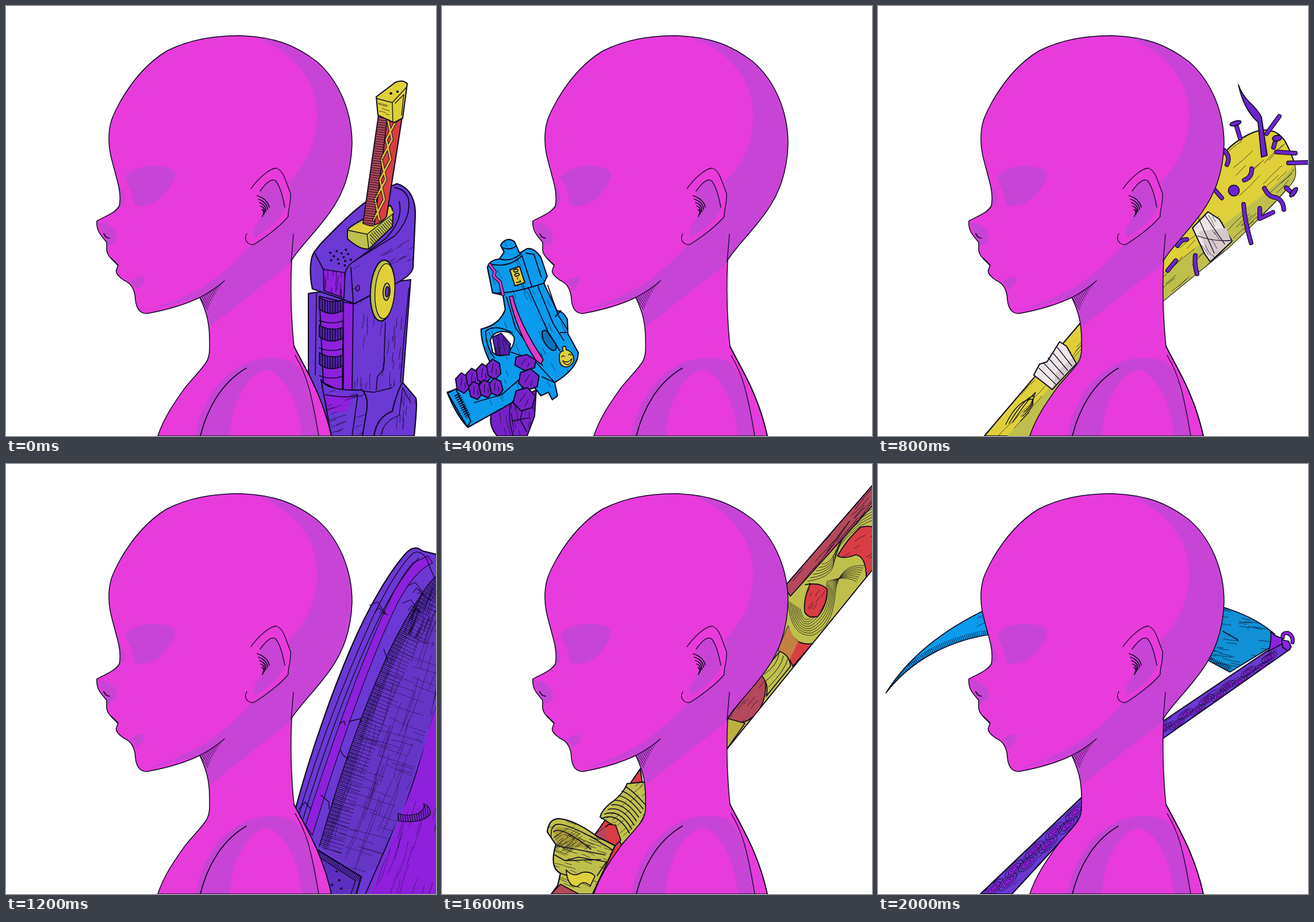
These frames come from a looping animation (748x748 px, 2400 ms). An HTML page:

```html
<!DOCTYPE html>
<html lang="en">
<head>
<meta charset="utf-8">
<title>Weapon cycle</title>
<style>
  html, body { margin: 0; width: 100%; height: 100%; overflow: hidden; background: #fff; }
  svg { display: block; width: 100vw; height: 100vh; }
  path, ellipse { stroke-linecap: round; stroke-linejoin: round; }
</style>
</head>
<body>
<svg id="stage" viewBox="0 0 748 748"></svg>
<script>
const STEP = 400;
const ink = '#0b0820', pink = '#e83bdc', mauve = '#c844d6', indigo = '#6b38d4', violet = '#8e20dc',
  plum = '#5521aa', grape = '#7722c8', yellow = '#dfd03a', olive = '#bfc04b', red = '#d93d43',
  wine = '#b5485a', blue = '#0a9bec', steel = '#1090d6', bone = '#eee6e6';

let seed = 7, clips = 0;
const rand = (a, b) => {
  seed = seed + 0x6d2b79f5 | 0;
  let t = Math.imul(seed ^ seed >>> 15, 1 | seed);
  t = t + Math.imul(t ^ t >>> 7, 61 | t) ^ t;
  return a + (b - a) * ((t ^ t >>> 14) >>> 0) / 2 ** 32;
};
const repeat = (n, make) => Array.from({ length: n }, (_, i) => make(i)).join('');
const polar = (r, deg) => [r * Math.cos(deg * Math.PI / 180), r * Math.sin(deg * Math.PI / 180)];

const shape = (d, fill, w = 1.7, stroke = ink) =>
  `<path d="${d}" fill="${fill}" stroke="${stroke}" stroke-width="${w}"/>`;
const flat = (d, fill) => shape(d, fill, 0);
const line = (d, w = 1.3, color = ink) => shape(d, 'none', w, color);
const oval = (x, y, rx, ry, fill, turn = 0, w = 1.6) =>
  `<ellipse rx="${rx}" ry="${ry}" fill="${fill}" stroke="${ink}" stroke-width="${w}" transform="translate(${x} ${y}) rotate(${turn})"/>`;
const clipped = (d, content) => {
  const id = 'clip' + clips++;
  return `<clipPath id="${id}"><path d="${d}"/></clipPath><g clip-path="url(#${id})">${content}</g>`;
};
// Outlines use absolute coordinate pairs only, so their bounds can be read from the path.
const bounds = d => {
  const n = d.match(/[\d.]+/g).map(Number);
  const range = odd => {
    const v = n.filter((_, i) => i % 2 === odd);
    return [Math.min(...v), Math.max(...v)];
  };
  return [range(0), range(1)];
};
// Scattered, slightly bent pen strokes inside an outline.
const grain = (d, angle, length, count, w = 0.7) => {
  const [xs, ys] = bounds(d);
  return clipped(d, line(repeat(count, () => {
    const [dx, dy] = polar(length * rand(0.4, 1.2), angle + rand(-4, 4));
    const bend = rand(-0.08, 0.08);
    const p = [rand(...xs) - dx / 2, rand(...ys) - dy / 2].map(v => v.toFixed(1));
    const q = [dx / 2 - dy * bend, dy / 2 + dx * bend, dx, dy].map(v => v.toFixed(1));
    return `M${p}q${q}`;
  }), w));
};
// Short hatch marks across a guide line, kept inside an outline.
const fringe = (d, guide, width, gap = 2.5, mark = 1) => clipped(d,
  `<path d="${guide}" fill="none" stroke="${ink}" stroke-width="${width}" stroke-dasharray="${mark} ${gap}" style="stroke-linecap:butt"/>`);
const speckle = (x, y, rx, ry, n, r = 2) => repeat(n, i => {
  const [dx, dy] = polar(Math.sqrt((i + 0.5) / n), i * 137.5);
  return oval(x + dx * rx, y + dy * ry, r, r, ink, 0, 0);
});

function bust() {
  const body = 'M264 748C275 715 293 690 310 666C322 650 336 637 346 623C356 610 354 595 354 580C354 550 348 530 337 507Q300 525 245 535C230 535 226 522 225 510C224 490 215 481 205 477C195 470 190 464 192 459L195 451C185 441 174 434 175 420L175 411C163 397 157 390 158 374C172 366 190 360 197 348C200 335 197 315 192 298C185 270 179 255 179 232C179 205 184 193 200 164C224 123 250 96 280 78C320 58 360 52 405 51.5C470 53 505 70 540 96C580 130 602 185 602 240C600 300 580 340 552 374C530 402 508 424 497 442C494 500 496 545 501 592C520 630 550 675 566 748Z';
  const shades = [
    'M428 52C476 68 541 112 541 190C541 245 515 284 491 307L495 328L491 366Q470 388 428 414Q388 460 340 490Q300 512 240 532L337 507L356 557Q390 530 497 447L640 340L620 60Z',
    'M205 298C225 275 260 275 285 282Q297 288 293 300Q278 336 248 346Q226 352 222 342Q220 320 205 298Z',
    'M193 305Q206 320 206 340Q203 350 190 354Z',
    'M158 376Q200 380 191 412L177 418Z',
    'M217 479Q226 469 241 471Q240 485 228 493Z',
    'M441 326Q454 305 468 302Q480 316 486 350Q474 380 434 402Q424 393 442 370Q454 346 441 326Z',
    'M329 748C338 700 362 645 420 620C444 610 484 610 501 620C528 650 540 700 545 748L514 748C512 690 480 636 455 634C425 632 390 690 390 748Z'
  ];
  const throat = 'M337 507Q362 494 380 478Q360 502 349 533Z';
  return flat(body, pink) + clipped(body, shades.map(d => flat(d, mauve)).join('')) + line(body, 1.5)
    + line('M426 318C440 298 460 282 470 282C483 286 486 304 495 326C496 345 490 355 491 366C478 383 446 406 431 415C419 416 413 405 419 396M442 322C452 308 462 299 469 304C477 314 481 330 485 350')
    + line(repeat(5, i => `M${437 + i * 2} ${330 + i * 6}Q${455 - i} ${336 + i * 5} ${458 - i * 3} ${350 + i * 4}`), 1.7)
    + line('M500 397Q498 420 496 445M337 507Q362 494 380 478M503 608C522 640 530 665 544 748')
    + fringe(throat, 'M337 507L382 478', 60, 2.6, 0.7)
    + line('M170 396L174 402L180 404M183 439L195 451M338 748C350 700 375 655 418 630M501 592C520 630 550 675 566 748', 1.8);
}

function sheath() {
  const base = 'M526 500L704 476L690 660L700 748L566 748L526 636Z';
  const panel = 'M605 515L702 480L690 660L604 670Z';
  const head = 'M548 413C580 380 625 332 680 309C704 316 713 340 712 365L708 455Q706 474 640 500L606 518L588 511L533 492C528 470 528 440 536 428Z';
  const front = 'M552 458L590 464L588 508L553 495Z';
  const foot = 'M548 650Q556 670 620 668Q630 680 628 700L620 748L566 748Z';
  const bracket = 'M690 655L713 682Q716 690 710 748L640 748Q645 715 672 705Q680 670 690 655Z';
  const grip = 'M648 190L689 194L662 366Q645 388 621 378Z';
  const guard = 'M594 390Q596 382 668 347Q675 350 672 384L632 422Q618 426 594 405Z';
  const pommel = 'M644 158L677 133Q690 127 698 135L690 195L675 203L647 190Z';
  const spacer = y => {
    const d = `M545 ${y}Q565 ${y + 12} 587 ${y + 4}L586 ${y + 23}Q563 ${y + 34} 545 ${y + 20}Z`;
    return shape(d, plum) + fringe(d, `M545 ${y + 14}L587 ${y + 14}`, 40, 3, 1.5)
      + line(`M545 ${y + 40}Q566 ${y + 48} 586 ${y + 41}`, 1.5);
  };
  const weave = side => `M${672 + side * 8} 197` + repeat(5, i => {
    const s = i % 2 ? side : -side;
    return `l${-5.5 + s * 13} 35`;
  });
  return shape(base, indigo, 2) + grain(panel, 95, 22, 45)
    + shape('M545 505L587 515L585 672L552 655Z', violet, 2) + repeat(3, i => spacer(507 + i * 48))
    + shape('M587 515L604 518L602 672L587 670Z', violet)
    + line('M540 500L538 642M660 550L657 632L646 645L644 668M701 490L692 580L686 655M604 668L640 672L672 664', 1.5)
    + shape(foot, indigo, 2) + flat('M554 676L604 677L592 706L560 705Z', violet) + grain(foot, -20, 22, 22)
    + line('M556 676Q595 684 612 676L602 748', 1.6)
    + shape(bracket, indigo, 2.2) + line('M652 748Q656 722 684 712L690 664L704 690') + grain(bracket, 95, 20, 18)
    + shape(head, indigo, 2.2) + grain('M592 462L712 400L708 455L606 518Z', -28, 24, 28)
    + shape(front, violet) + grain(front, 93, 25, 14)
    + line('M536 428L552 458M590 464Q594 450 607 443L676 400Q706 368 700 335Q694 318 676 316M600 455L604 516M607 443L660 405Q692 372 684 340', 1.8)
    + speckle(583, 437, 22, 16, 13) + oval(612, 491, 3, 5, violet, 15)
    + shape(guard, olive, 2) + flat('M597 388L668 350L674 360L628 397Z', yellow)
    + line('M594 390L628 397L675 360M628 397L631 422') + fringe('M633 397L674 364L672 384L634 420Z', 'M633 410L674 374', 50, 3)
    + shape(grip, red, 2) + clipped(grip, shape('M648 190L663 197L640 388L621 378Z', wine)
      + [5, 3].map((w, i) => line(weave(1) + weave(-1), w, i ? '#dfbd39' : ink)).join(''))
    + fringe('M648 190L663 197L640 388L621 378Z', 'M656 190L630 385', 24, 3.2)
    + shape(pommel, yellow, 2) + line('M645 161L672 168L697 141M672 168L673 202M677 169L692 154L688 190')
    + grain('M647 168L667 172L667 198L650 190Z', 15, 18, 8) + speckle(676, 149, 10, 5, 2, 2.3)
    + oval(655, 495, 21, 53, olive, 4, 2.2) + oval(659, 496, 17, 48, yellow, 4, 1.3)
    + oval(662, 497, 6, 15, olive, 4) + oval(663, 497, 3, 9, indigo, 4);
}

function pistol() {
  const frame = 'M79 455Q82 442 100 440L108 428L102 416Q112 400 126 410L135 430L148 422Q160 420 172 437L183 470L177 482L200 530Q210 530 218 545L219 570L237 603Q237 630 196 655L201 678L192 685L185 672L172 678L150 650L122 690L45 733Q25 712 9 672L68 650L85 622Q68 590 68 562Q100 555 110 528L106 503L88 499Z';
  const palm = 'M118 690L86 708Q80 730 96 748L148 748L161 714L164 668Z';
  const stock = 'M10 674L24 666L50 722L44 732Z';
  const finger = 'M88 576L103 569L119 588L117 607L94 607Z';
  const knuckle = (x, y, w, h, turn) => {
    const at = repeat(6, i => {
      const [dx, dy] = polar(1, i * 60 + 30);
      return `${i ? 'L' : 'M'}${dx * w} ${dy * h}`;
    });
    return `<g transform="translate(${x} ${y}) rotate(${turn})">${shape(at + 'Z', grape, 2) + line(`M${-w / 3} ${h / 3}L0 ${-h / 2}M${w / 4} ${h / 2}L${w / 3} 0`, 0.9)}</g>`;
  };
  const rib = 'M83 450L92 462L90 470L101 480L106 502';
  return shape(palm, grape, 2) + grain(palm, 80, 28, 34) + line('M119 694Q114 718 124 748M140 703L136 720L147 740M122 722L152 716', 1.6)
    + shape(frame, blue, 2.2) + grain(frame, 66, 18, 130, 0.6)
    + shape('M84 582Q88 568 104 566Q122 566 126 578Q126 592 112 606Q98 612 88 602Z', '#fff', 2)
    + shape(finger, plum) + grain(finger, 80, 24, 12)
    + line('M76 566Q90 552 122 568M76 566Q76 592 91 612M104 420Q118 426 128 418M100 440Q118 446 138 431M84 449Q118 456 139 434L156 487M146 430L160 432L172 470M88 499Q118 502 178 482', 1.9)
    + line(repeat(3, i => `M${150 + i * 17} ${490 - i * 2}L${184 + i * 9} ${566 - i * 14}L${205 + i * 7} ${600 - i * 18}`) + 'M112 506L128 560L175 625M207 530L197 540M206 568L219 568M120 602L160 616L196 655L174 645M56 690L104 676L134 650', 1.8)
    + line(rib, 6) + line(rib, 3.5, '#e23bc9')
    + shape('M117 506L123 504Q134 552 176 615L172 623L163 616Q130 566 117 506Z', '#e23bc9')
    + shape('M174 570Q174 562 182 565L198 588Q201 601 192 599Q176 590 174 570Z', '#0c74ba', 2)
    + shape(stock, blue, 2) + fringe('M20 676L30 672L50 712L42 718Z', 'M24 672L46 716', 16, 2, 2)
    + repeat(4, i => knuckle(36 + i * 18, 656 - i * 8, 13, 18, -8))
    + repeat(3, i => knuckle(58 + i * 18, 669 - i * 3, 12, 16, -14))
    + knuckle(145, 620, 20, 14, 8) + knuckle(151, 650, 19, 19, 10) + knuckle(143, 684, 20, 21, 15)
    + shape('M118 459L135 453L144 481L127 487Z', yellow, 2)
    + `<text transform="translate(131 470) rotate(76)" y="4.7" text-anchor="middle" font-family="Roboto, sans-serif" font-size="13" font-weight="700" fill="${ink}">00-1</text>`
    + shape('M211 600Q207 591 215 592L216 598Q226 600 229 611Q231 624 217 628Q204 628 204 612Q204 600 211 600Z', yellow)
    + line('M208 611Q211 606 213 610M220 607Q223 603 225 608M210 617Q219 623 226 613Q225 624 217 624Q212 622 210 617');
}

function bat() {
  const barrel = 'M480 440L602 256Q624 231 655 219Q690 208 708 235Q735 285 722 305Q700 335 610 420L490 518Z';
  const handle = 'M185 748L360 542L360 612L264 748Z';
  const tape = 'M547 386L574 358L594 371L616 409L578 445L568 431Z';
  const wrap = 'M271 642L281 623L294 619L316 584L328 592L345 622L303 667Z';
  const nails = 'M602 251Q614 262 607 276M586 320L598 334M552 434Q550 450 555 466M537 406Q527 406 521 417M518 443L504 460M623 207L630 230M698 192L676 222M692 232L688 246M750 272L714 273M693 254L726 256M710 316L722 327M672 317Q680 333 692 333Q705 338 706 354M664 352L664 370L687 359M636 345Q638 375 649 412M650 283Q651 298 637 303';
  return shape(barrel, yellow, 2) + shape(handle, yellow, 2)
    + clipped(barrel, flat('M727 272Q700 310 590 388L470 490L490 520L740 330Z', olive))
    + clipped(handle, flat('M264 748L225 748L360 592L360 620Z', olive))
    + grain(barrel, -43, 44, 100) + grain(handle, -47, 40, 50)
    + line(repeat(3, i => `M${222 + i * 6} ${728 - i * 2}Q${244 + i * 10} ${684 - i * 2} ${268 + i * 3} ${684 - i * 6}Q${276 - i * 6} ${694 + i * 4} ${248 + i * 3} ${722 - i * 8}`))
    + shape(tape, bone, 2) + flat('M558 392L606 386L614 408L578 442Z', '#d7c8cb')
    + line('M558 370L585 430M568 363L603 414M556 400Q585 410 613 408') + grain(tape, 58, 22, 16)
    + shape(wrap, bone, 2) + flat('M310 638L338 612L344 622L303 665Z', '#d7c8cb')
    + line(repeat(5, i => `M${280 + i * 8} ${630 - i * 9}L${309 + i * 7} ${658 - i * 8}`))
    + line(nails, 8) + line(nails, 5.6, '#6d24cb')
    + shape('M627 137Q633 154 645 166Q662 182 667 193L677 260L667 263L661 202Q636 180 627 137Z', '#6d24cb')
    + oval(622, 204, 10, 4, '#6d24cb', -16) + oval(694, 230, 8, 5, '#6d24cb', -8)
    + oval(723, 324, 4, 10, '#6d24cb', 38) + oval(619, 321, 9.5, 9.5, '#6d24cb');
}

function shield() {
  const plate = 'M503 602C530 500 570 390 600 320C630 250 665 190 695 156Q710 139 724 151L760 160L760 760L560 760Z';
  const rim = 'M760 190Q742 194 722 228Q680 292 656 350C620 430 584 530 545 665';
  const mesh = rim + 'L616 715L645 700C682 630 716 548 735 450L760 340Z';
  const inner = 'M760 330C742 440 716 544 690 600L620 760L760 760Z';
  const box = 'M540 670L618 718L606 760L560 760Z';
  const hook = 'M682 608Q702 614 718 607Q731 599 726 591Q740 596 738 610Q722 626 682 621Z';
  const chip = (x, y) => line(`M${x - 14} ${y - 4}l14 -6l16 22l-14 -12l-6 8M${x + 4} ${y + 8}l14 4`, 1.1);
  return shape(plate, indigo, 2.2)
    + shape('M521 628C556 520 594 410 628 328C656 258 682 200 708 172L734 160L742 172Q710 186 680 244C640 326 588 466 533 646Z', violet, 1.1)
    + line('M509 612C550 470 600 350 640 262Q684 174 710 154Q722 150 731 164L748 205M516 620C558 480 608 350 652 262Q690 190 718 164')
    + flat(mesh, '#6535c6') + grain(mesh, 110, 120, 75, 0.5) + grain(mesh, 18, 85, 85, 0.5)
    + fringe(mesh, rim, 34, 2.4, 0.8) + fringe(mesh, rim, 80, 6, 0.6)
    + grain('M760 200L722 228L690 290L760 330Z', 112, 60, 40) + line(rim, 1.4)
    + shape(inner, violet, 1.8) + line('M752 388Q722 530 632 748', 3.5, indigo) + grain(inner, 108, 58, 70, 0.5)
    + shape(hook, grape, 1.2) + fringe(hook, 'M682 614L738 606', 40, 3)
    + chip(646, 250) + chip(712, 216) + chip(704, 246) + line('M657 322L664 342M580 452L588 447L590 454M597 448L616 443L618 450M582 498Q586 510 596 512M510 600L520 588L530 600M548 576L562 588L562 600')
    + shape(box, '#5c2fc0', 2.6) + fringe(box, 'M540 670L618 718', 20, 2) + line('M545 684L608 725L600 748') + speckle(574, 724, 18, 22, 5);
}

function scabbard() {
  const tube = 'M597 212L760 24L760 170L494 498L470 470L497 430Z';
  const edge = 'M596 213L760 24L760 60L606 230Z';
  const lower = 'M345 530L275 632L190 748L265 748L355 600Z';
  const coils = 'M353 553L322 556Q314 576 293 590Q278 602 275 614L300 630L312 663L342 630L356 605Z';
  const ring = 'M183 640Q186 616 205 617Q232 620 270 648L301 664L262 748L198 748L206 712Q186 702 198 662Z';
  const blob = 'M632 210Q660 205 670 218Q670 245 654 265Q638 270 631 258Q628 234 641 208Z';
  const patch = 'M688 160Q705 130 728 110Q742 106 760 112L760 185L738 198Q738 160 719 158Q700 166 688 160Z';
  const band = 'M497 442L558 362Q570 390 554 424Q536 454 508 449Z';
  const swirls = repeat(8, i => `M${602 + i * 3} ${238 + i * 2}Q${606 + i * 3} ${302 - i * 4} ${644 - i} ${298 - i * 4}Q${680 - i * 2} ${285 - i * 5} ${684 - i * 2} ${225 - i * 3}Q${690 + i * 2} ${172 + i * 3} ${735 - i * 2} ${177 + i * 4}`)
    + repeat(6, i => `M${636 + i * 5} ${204 - i * 6}Q${690 - i * 2} ${196 - i * 4} ${680 + i * 4} ${160 - i * 8}Q${710 + i} ${112 - i * 4} 748 ${98 - i * 5}`);
  const turns = repeat(8, i => `M${277 + i * 6} ${617 - i * 8}Q${305 + i * 4} ${604 - i * 5} ${326 + i * 4} ${642 - i * 7}`);
  return shape(tube, olive) + clipped(tube, line(swirls, 0.8)
      + shape('M586 320L602 282Q612 318 645 312L610 352Q600 326 586 326Z', red)
      + flat('M586 320L602 282Q612 305 620 308L604 342Q597 330 586 326Z', '#c58043')
      + shape(band, wine) + shape('M554 366L588 326Q606 334 606 352L564 404Q570 382 554 366Z', olive)
      + line(repeat(3, i => `M${560 + i * 4} ${366 + i * 11}Q${584 + i * 6} ${350 + i * 5} ${586 + i * 8} ${330 + i * 4}`), 1)
      + shape('M494 442L527 451L494 498Z', '#bcb13e') + shape(blob, red) + shape(patch, red))
    + grain(patch, 150, 18, 16) + grain(blob, -55, 12, 12) + grain(band, -50, 18, 18)
    + shape(edge, wine) + grain(edge, -49, 50, 160, 0.9) + line(tube)
    + shape(lower, red, 2) + grain(lower, -55, 16, 60)
    + shape(coils, olive, 2) + line(turns, 1.6) + grain(coils, -42, 18, 34)
    + shape('M265 646L290 627L302 628L311 654L301 664Z', red) + flat('M266 645L284 631L287 656Z', wine)
    + shape(ring, olive, 2.2) + flat('M194 637Q200 626 218 636Q246 649 256 668L200 664Z', '#a99e37')
    + line('M190 648Q188 624 207 627Q238 633 296 671M194 640Q206 628 259 670M200 664Q222 668 284 680M196 680L214 690L276 688M206 712L255 728M214 690L237 684L286 692L270 716', 1.6)
    + grain('M190 630L230 630L262 668L200 680Z', -38, 24, 45) + grain(ring, 20, 26, 50)
    + shape('M216 706Q228 720 242 711Q258 707 266 717L258 734Q246 722 236 735Q218 736 216 706Z', yellow)
    + shape('M206 731L238 748L190 748Z', wine);
}

function scythe() {
  const lip = 'M200 296C130 305 60 338 14 398';
  const tip = lip + 'C50 340 110 290 190 252Z';
  const blade = 'M590 246C640 260 670 278 690 296L684 318L612 362L560 334Z';
  const shaft = 'M178 748L354 580L365 605L233 748Z';
  const pole = 'M480 458L704 307L717 322L485 485Z';
  const hoop = 'M704 302Q703 293 713 294Q723 299 721 310';
  // Wood figure: nested rings that alternate across the width of a shaft.
  const knots = (x, y, angle, spacing, n, size) => repeat(n, i => {
    const [dx, dy] = polar(i * spacing, angle);
    const [ox, oy] = polar(i % 2 ? size : -size, angle + 90);
    return [3, 2, 1].map(k => oval(x + dx + ox * 0.6, y + dy + oy * 0.6, k * size, k * size * 0.38, k === 2 ? violet : 'none', angle, 0.8)).join('');
  });
  return shape(tip, blue) + grain(tip, -28, 28, 60) + fringe(tip, lip, 18, 2.4, 0.8)
    + shape(blade, steel) + grain(blade, 10, 28, 42)
    + fringe('M565 334L580 336Q600 348 618 350L612 362Z', 'M565 336L612 358', 20, 2, 1.2) + line('M600 291L626 306', 1.8)
    + line(hoop, 7) + line(hoop, 4.2, violet)
    + shape(shaft, indigo, 2) + clipped(shaft, knots(205, 740, -43, 24, 9, 7)) + grain(shaft, -43, 28, 50)
    + shape(pole, indigo, 2) + clipped(pole, knots(500, 462, -34, 22, 11, 5)) + grain(pole, -34, 24, 60)
    + shape('M683 291Q690 300 703 303L706 311L679 326Q685 310 683 291Z', violet)
    + shape('M702 306L714 308L719 318L713 325L704 319Z', violet);
}

const layers = [sheath, pistol, bat, shield, scabbard, scythe];
const stage = document.getElementById('stage');
stage.innerHTML = layers.map(draw => `<g class="item">${draw()}</g>`).join('') + bust();

const duration = STEP * layers.length;
stage.querySelectorAll('.item').forEach((item, i) => item.animate([
  { opacity: 1, easing: 'step-end' },
  { opacity: 0, offset: 1 / layers.length, easing: 'step-end' },
  { opacity: 0 }
], { duration, delay: i * STEP - duration, iterations: Infinity }));
</script>
</body>
</html>
```
